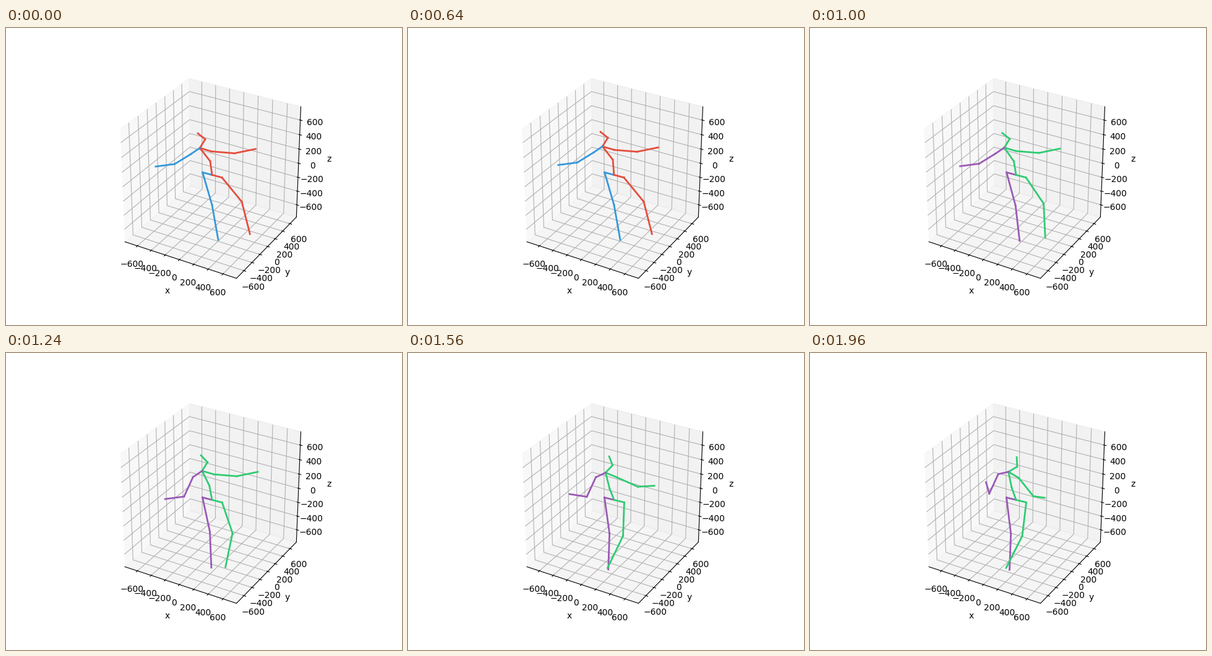
A matplotlib script that plays this animation: 640x480 px, repeating every 2 s.

```python
import numpy as np
import matplotlib.pyplot as plt
from matplotlib.animation import FuncAnimation
from matplotlib.patches import Polygon

W, H, DPI = 640, 480, 100
FRAMES, STEP = 50, 40
SWITCH = 1000           # ms at which the colours change
LIMIT = 750
WALL = 0.5 * 25 / 24    # half width of the box, data range = 1
POINT = 0.007516        # one point of padding in box units

# Perspective camera: elevation 30, azimuth -60, distance 10
ELEV, AZIM, DIST = np.radians(30), np.radians(-60), 10
CENTER = np.array([333.0, 237.4])
ZOOM = 1997.8
TOWARD = np.array([np.cos(AZIM) * np.cos(ELEV),
                   np.sin(AZIM) * np.cos(ELEV),
                   np.sin(ELEV)])
RIGHT = np.array([-np.sin(AZIM), np.cos(AZIM), 0])
UP = np.cross(TOWARD, RIGHT)

SQUARE = [(-1, -1), (1, -1), (1, 1), (-1, 1)]
CUBE = WALL * np.array([(x, y, z) for z in (-1, 1) for x, y in SQUARE])
FAR = CUBE[3]


def project(points):
    p = np.asarray(points, float)
    scale = ZOOM / (DIST - p @ TOWARD)
    return np.stack([CENTER[0] + scale * (p @ RIGHT),
                     CENTER[1] - scale * (p @ UP)], axis=-1)


fig = plt.figure(figsize=(W / DPI, H / DPI), dpi=DPI, facecolor="white")
ax = fig.add_axes([0, 0, 1, 1])
ax.set(xlim=(0, W), ylim=(H, 0))
ax.axis("off")


def line(points, color, width, cap="projecting"):
    x, y = project(points).T
    ax.plot(x, y, color=color, lw=width, solid_capstyle=cap)


def with_value(point, axis, value):
    out = np.array(point, float)
    out[axis] = value
    return out


def flipped(point, axis):
    return with_value(point, axis, -point[axis])


def draw_pane(corners, grey):
    color = (grey, grey, grey, 0.5)
    ax.add_patch(Polygon(project(CUBE[corners]), closed=False,
                         fc=color, ec=color, lw=1))


def draw_axis(axis, name, edge, tick_dir):
    edge = np.array(edge, float)
    rim = edge * WALL
    line([with_value(rim, axis, -WALL), with_value(rim, axis, WALL)],
         "black", 0.8)
    x, y = project(edge * (WALL + 25 * POINT))
    ax.text(x, y, name, ha="center", va="center", fontsize=10)

    a, b = [k for k in range(3) if k != axis]
    ticks = range(-600, 601, 200)
    for tick in ticks:
        corner = with_value(FAR, axis, tick / (2 * LIMIT))
        line([flipped(corner, a), corner, flipped(corner, b)],
             "#b0b0b0", 0.8, "butt")
    for tick in ticks:
        loc = tick / (2 * LIMIT)
        base = with_value(rim, axis, loc)
        line([with_value(base, tick_dir, edge[tick_dir] * (WALL + d / 12))
              for d in (0.2, -0.1)], "black", 0.8)
        x, y = project(with_value(edge * (WALL + 11.5 * POINT), axis, loc))
        ax.text(x, y, str(tick).replace("-", "\u2212"),
                ha="center", va="top", fontsize=10)


draw_pane([0, 3, 7, 4], 0.95)
draw_pane([3, 2, 6, 7], 0.90)
draw_pane([0, 1, 2, 3], 0.925)
draw_axis(0, "x", (0, -1, -1), 1)
draw_axis(1, "y", (1, 0, -1), 0)
draw_axis(2, "z", (1, 1, 0), 0)

# Each movement eases once, between two times in ms
STEP_IN = (650, 1650)
TURN = (800, 1750)
PULL = (1000, 1240)
LEAN = (1000, 1960)
REACH = (1240, 1960)
FLICK = (1400, 1960)

LEFT = ("#3498db", "#9b59b6")
RIGHT_SIDE = ("#e74c3c", "#2ecc71")

# joint: parent, colours, movement, bone at rest, bone at the end
RIG = {
    "left hip": ("pelvis", LEFT, TURN, -15.3 - 4j, -15.5 - 3.8j),
    "left knee": ("left hip", LEFT, TURN, 15.4 + 53j, 7.2 + 58.5j),
    "left foot": ("left knee", LEFT, STEP_IN, 9.9 + 56j, -2.2 + 58.3j),
    "right hip": ("pelvis", RIGHT_SIDE, TURN, 16 + 4.3j, 16.5 + 4j),
    "right knee": ("right hip", RIGHT_SIDE, TURN, 32 + 39j, -6.5 + 54.4j),
    "right foot": ("right knee", RIGHT_SIDE, STEP_IN,
                   13.3 + 52.3j, -26 + 51.5j),
    "spine": ("pelvis", RIGHT_SIDE, TURN, -3 - 22j, -7.7 - 18.2j),
    "neck": ("spine", RIGHT_SIDE, TURN, -16.7 - 21.5j, -5.2 - 25.5j),
    "nose": ("neck", RIGHT_SIDE, REACH, 8.7 - 14j, 14 - 8.3j),
    "head": ("nose", RIGHT_SIDE, LEAN, -12 - 9.6j, -0.6 - 15.3j),
    "right shoulder": ("neck", RIGHT_SIDE, REACH, 19 + 5.6j, 16.5 + 9.7j),
    "right elbow": ("right shoulder", RIGHT_SIDE, REACH,
                    37 + 3j, 23.7 + 29.7j),
    "right hand": ("right elbow", RIGHT_SIDE, REACH, 34 - 7j, 18.3 + 2.6j),
    "left shoulder": ("neck", LEFT, REACH, -14.7 + 10j, -16.5 + 3.7j),
    "left elbow": ("left shoulder", LEFT, PULL, -26 + 16j, -14.5 + 31.5j),
    "left hand": ("left elbow", LEFT, FLICK, -30.7 + 4j, -5.3 - 18.5j),
}


def ease(t, span):
    u = np.clip((t - span[0]) / (span[1] - span[0]), 0, 1)
    return u * u * (3 - 2 * u)


def bob(t):
    """The upper body rises and sinks once every 600 ms."""
    phase = 2 * np.pi * max(t - 340, 0) / 600
    return (0.5 - 1.25j) * (1 - np.cos(phase))


def pose(t):
    """Swing every bone, in angle and length, from rest to its end."""
    joints = {"pelvis": complex(*CENTER)}
    for name, (parent, _, span, rest, end) in RIG.items():
        joints[name] = joints[parent] + rest * (end / rest) ** ease(t, span)
        if name == "spine":
            joints[name] += bob(t)
    return joints


bones = {name: ax.plot([], [], lw=2, solid_capstyle="projecting")[0]
         for name in RIG}


def update(frame):
    t = frame * STEP
    joints = pose(t)
    for name, bone in bones.items():
        parent, colors = RIG[name][:2]
        ends = np.array([joints[parent], joints[name]])
        bone.set_data(ends.real, ends.imag)
        bone.set_color(colors[t >= SWITCH])
    return list(bones.values())


anim = FuncAnimation(fig, update, frames=FRAMES, interval=STEP, repeat=True)
plt.show()
```
